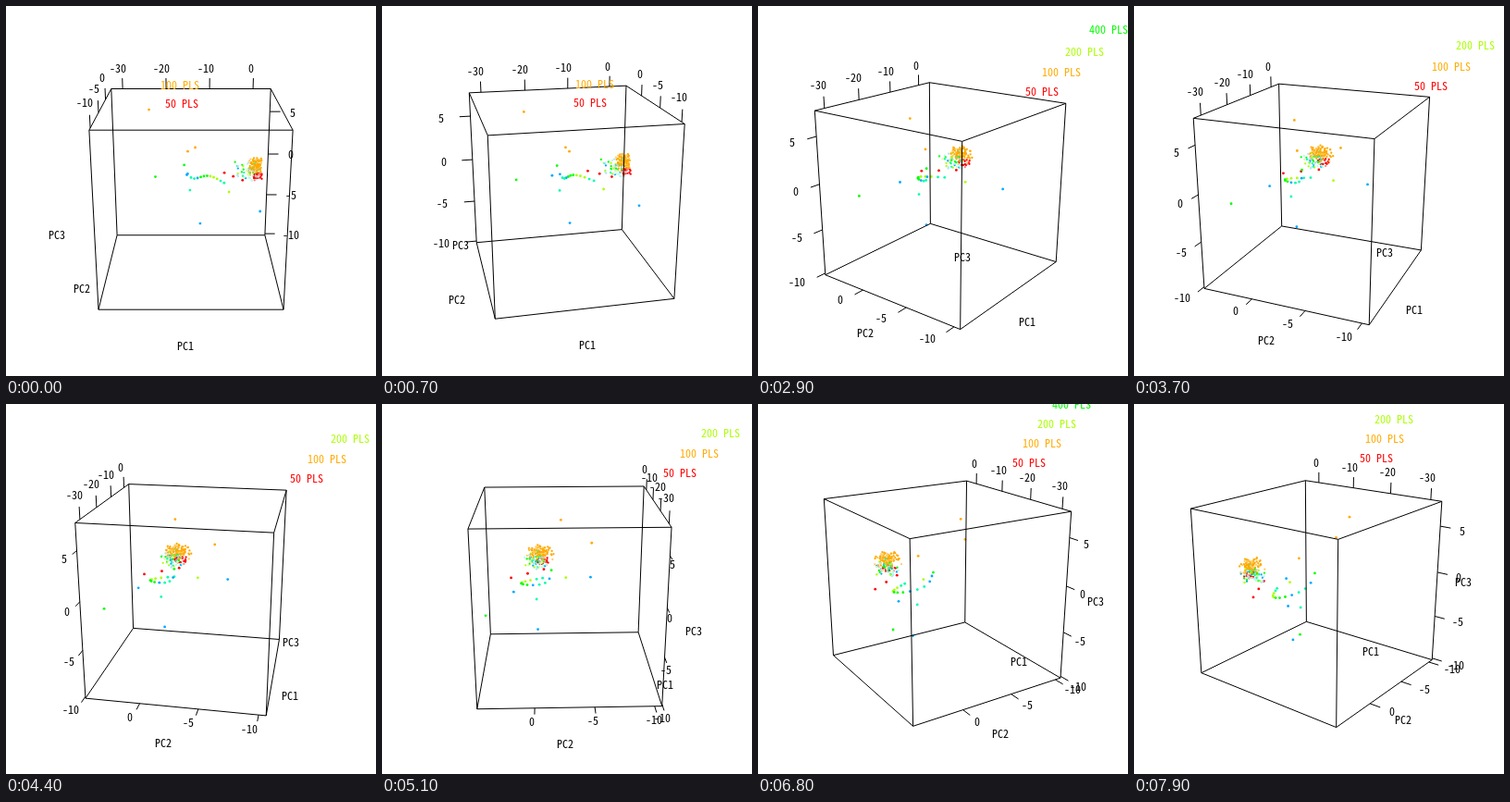
Write an HTML page with a canvas that moves like this. It is 400 px wide and 400 px high and loops after 8000 ms.

```html
<!DOCTYPE html>
<html lang="en">
<head>
<meta charset="utf-8">
<title>Rotating PCA plot</title>
<style>
html, body { margin: 0; width: 100%; height: 100%; overflow: hidden; background: #fff; }
canvas { display: block; }
</style>
</head>
<body>
<canvas id="stage" width="400" height="400"></canvas>
<script>
const g = document.getElementById('stage').getContext('2d');
const FAMILY = '"Noto Sans Mono CJK JP", "DejaVu Sans Mono", monospace';
const STEP = 100, FRAMES = 80, TURN = 1.8 * Math.PI / 180;

// Nine-step rainbow
const hue = (i, light = 50) => `hsl(${40 * i}, 100%, ${light}%)`;
const [RED, ORANGE, LIME, GREEN, TEAL, BLUE] = [0, 1, 2, 3, 4, 5].map(i => hue(i));

// Camera: 30 degree field of view, pitched down 20 degrees, unit cube at the origin
const FOCAL = 200 / Math.tan(Math.PI / 12), DIST = 4.03, NEAR = 2.987;
const SP = Math.sin(Math.PI / 9), CP = Math.cos(Math.PI / 9);
const TICK = 1 / 15, MARGIN = .64;
let cos = 1, sin = 0;

function project([x, y, z]) {
  const X = x * cos - z * sin, Z = z * cos + x * sin;
  const d = DIST - y * SP + Z * CP;
  return [200 + FOCAL * X / d, 200 - FOCAL * (y * CP + Z * SP) / d, d];
}

// Every character cell is 6 px wide
g.font = '12px ' + FAMILY;
const FONT = 72 / g.measureText('0').width + 'px ' + FAMILY;

function label(str, cx, cy, color = '#000') {
  g.fillStyle = color;
  g.fillText(str, Math.round(cx - 3 * str.length), Math.round(cy + 4.4));
}

function line(a, b) {
  const p = project(a), q = project(b);
  g.beginPath();
  g.moveTo(p[0], p[1]);
  g.lineTo(q[0], q[1]);
  g.stroke();
}

let seed = 7;
const rand = () => (seed = seed * 16807 % 2147483647) / 2147483647;
const spread = r => (rand() + rand() - 1) * r;
const dots = [];
const add = (color, at, r = 1.4) => dots.push({ color, at, r });

function cloud(count, colors, center, size) {
  for (let i = 0; i < count; i++)
    add(colors[i % colors.length], center.map((c, j) => c + spread(size[j])), 1.15);
}

cloud(100, [ORANGE, ORANGE, ORANGE, hue(1, 70)], [.388, .105, .157], [.045, .042, .085]);
cloud(26, [RED, RED, hue(0, 75)], [.402, .045, .14], [.04, .025, .05]);
cloud(60, [TEAL, hue(4, 85), LIME, '#ccc', hue(5, 85), GREEN, hue(2, 80), BLUE],
  [.35, .062, .185], [.085, .06, .075]);

// Points far from the rest
add(ORANGE, [-.238, .475, .04]);
add(ORANGE, [.025, .22, .15]);
add(ORANGE, [-.018, .283, -.14]);
add(GREEN, [-.231, -.068, .458]);
add(BLUE, [.057, -.278, .174]);
add(BLUE, [.39, -.063, -.163]);
add(BLUE, [-.026, -.005, .31]);
add(TEAL, [-.006, -.059, .178]);
add(LIME, [.222, -.006, 0]);

// A loose trail leading to the clouds
[GREEN, BLUE, TEAL, TEAL, BLUE, GREEN, GREEN, GREEN, LIME, LIME, LIME, TEAL, TEAL].forEach((color, i) =>
  add(color, [.02 * i - .04, .13 * Math.exp(-.6 * i), .18 + .09 * Math.sin((i - 3.5) * .42)]));
for (let i = 0; i < 3; i++) add(RED, [.21 + .05 * i, .01 * i, .335 - .1 * i]);

function drawDots() {
  for (const dot of dots) dot.view = project(dot.at);
  dots.sort((a, b) => b.view[2] - a.view[2]);
  for (const { color, r, view } of dots) {
    g.fillStyle = color;
    g.beginPath();
    g.arc(view[0], view[1], r, 0, 7);
    g.fill();
  }
}

// at(v) gives the point on the edge, dir the way its ticks stick out
function axis(values, at, dir) {
  const lean = dir[0] * cos;
  for (const v of values) {
    const p = at(v), out = n => p.map((c, i) => c + dir[i] * TICK * n);
    line(p, out(1));
    const [x, y] = project(out(2)), str = String(v);
    label(str, x + (3.4 * lean - 1) * str.length + 1.8 * lean - 1.8, y + 1);
  }
}

function drawBox() {
  const h = [-.5, .5];
  for (const a of h) for (const b of h) {
    line([-.5, a, b], [.5, a, b]);
    line([a, -.5, b], [a, .5, b]);
    line([a, b, -.5], [a, b, .5]);
  }
}

function drawAxes(k) {
  const up = [0, 1, 0], left = [-1, 0, 0], right = [1, 0, 0];
  const back = k <= 50 ? .5 : -.5;      // far side of the cube
  const side = k > 0 ? -.5 : .5;        // side carrying the vertical scale
  axis([-30, -20, -10, 0], v => [.389 + v * .02725, .5, back], up);
  const depth = v => .19 + v * .065;
  if (k < 12) axis([0, -5, -10], v => [-side, .5, depth(v)], up);
  else axis([0, -5, -10], v => [-.5, -.5, depth(v)], left);
  axis([5, 0, -5, -10], v => [side, .073 + v * .0562, back], k > 0 ? left : right);
}

function drawNames() {
  const m = -MARGIN;
  [[0, m, m], [m, m, 0], [m, 0, m]].forEach((at, i) => {
    const [x, y] = project(at);
    label('PC' + (i + 1), x - 6, y);
  });
}

// An entry vanishes once its anchor leaves the view volume
function drawLegend() {
  for (let i = 0; i < 4; i++) {
    const b = .678 + .109 * i, str = 50 * 2 ** i + ' PLS';
    const [x, y, d] = project([0, .992 * b, -b]);
    if (d > NEAR && x < 400 && y > 0) label(str, x + 2 - 2 * str.length, y, hue(i));
  }
}

function draw(k) {
  cos = Math.cos(k * TURN);
  sin = Math.sin(k * TURN);
  g.fillStyle = '#fff';
  g.fillRect(0, 0, 400, 400);
  g.font = FONT;
  g.strokeStyle = '#000';
  g.lineWidth = 1;
  drawDots();
  drawBox();
  drawAxes(k);
  drawNames();
  drawLegend();
}

function tick() {
  draw(Math.floor(performance.now() / STEP) % FRAMES);
  requestAnimationFrame(tick);
}
tick();
</script>
</body>
</html>
```
